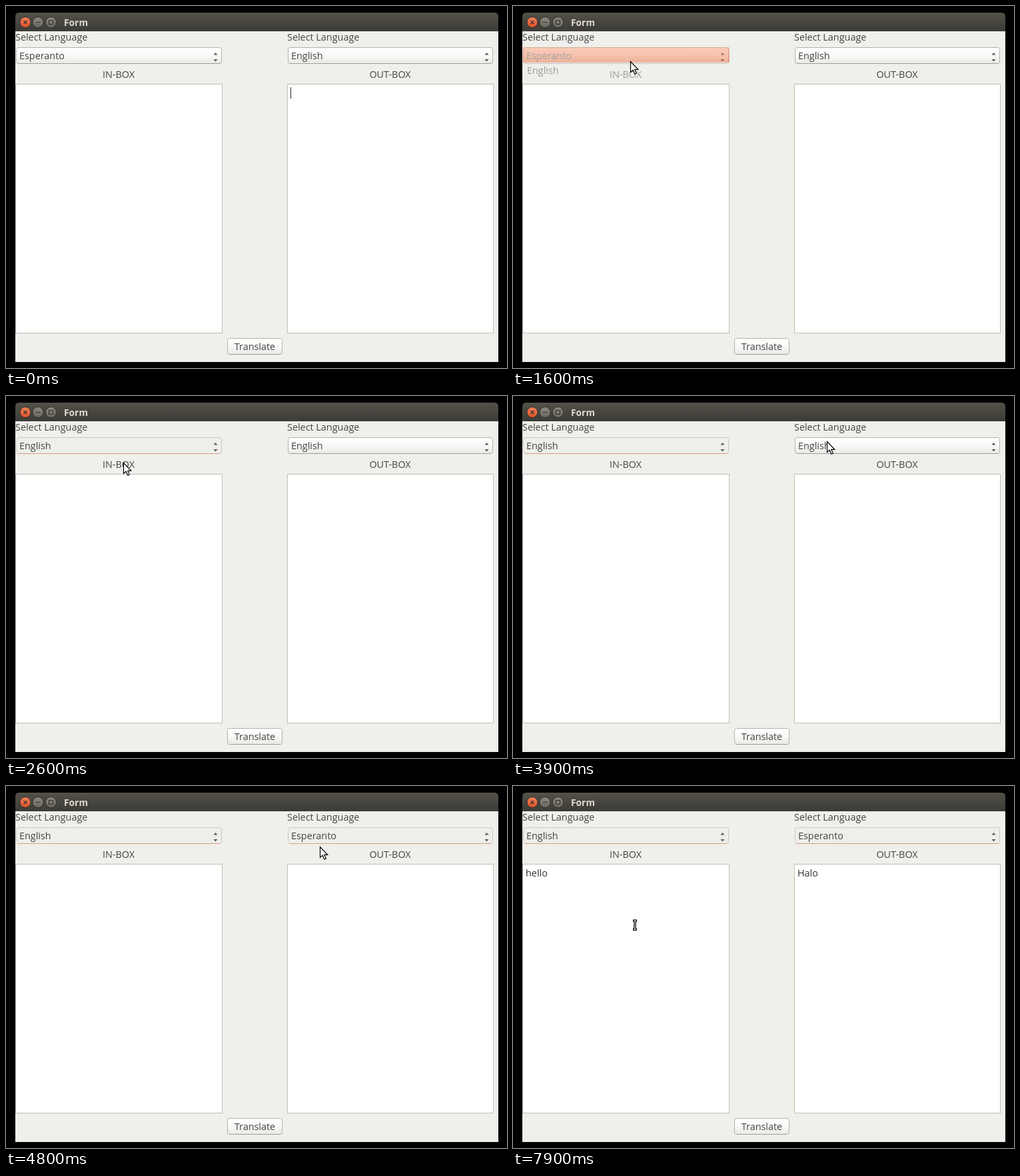
An HTML page for the animation above (8000 ms loop, 752x544 px).

```html
<!DOCTYPE html>
<html lang="en">
<head>
<meta charset="utf-8">
<title>Form</title>
<style>
  html, body { margin: 0; width: 100%; height: 100%; overflow: hidden; background: #000; }
  svg { display: block; width: 752px; height: 544px; }
  text { font: 14.4px "Open Sans", "Noto Sans", sans-serif; fill: #454543; white-space: pre; }
  .title { font-size: 13.8px; font-weight: 700; fill: #dfdbd2; }
  .mid { text-anchor: middle; }
  .area { fill: #fff; stroke: #bfbdb4; }
  .face { fill: url(#face); stroke: #b3b1aa; }
  .base { stroke: #a09e97; }
  .used .face { fill: #eeeeea; stroke: #c9c7c0; }
  .used .base { stroke: #dc9b82; }
  .arrows { fill: #5c5b58; }
  .popup .back { fill: #efefeb; }
  .popup .bar { fill: url(#select); }
  .popup .on { fill: #fff; }
  .typed { fill: #303030; }
</style>
</head>
<body>
<svg viewBox="0 0 752 544">
  <defs>
    <linearGradient id="bar" x2="0" y2="1">
      <stop stop-color="#565349"/><stop offset=".12" stop-color="#504e46"/><stop offset="1" stop-color="#3c3b37"/>
    </linearGradient>
    <linearGradient id="face" x2="0" y2="1">
      <stop stop-color="#fff"/><stop offset=".5" stop-color="#f9f9f8"/><stop offset="1" stop-color="#e8e8e5"/>
    </linearGradient>
    <linearGradient id="select" x2="0" y2="1">
      <stop stop-color="#f69c78"/><stop offset="1" stop-color="#ee7a50"/>
    </linearGradient>
    <linearGradient id="close" x2="0" y2="1">
      <stop stop-color="#f3845c"/><stop offset="1" stop-color="#dd4f24"/>
    </linearGradient>
    <linearGradient id="knob" x2="0" y2="1">
      <stop stop-color="#8d8a80"/><stop offset="1" stop-color="#68665e"/>
    </linearGradient>
  </defs>

  <path d="M14 38V16q0-6 6-6H733q6 0 6 6V38z" fill="url(#bar)"/>
  <path d="M14 38H739V535H14z" fill="#efefeb"/>
  <g stroke="#32312d">
    <circle cx="29" cy="24.5" r="8" fill="url(#close)"/>
    <circle cx="48" cy="24.5" r="8" fill="url(#knob)"/>
    <circle cx="67.500" cy="24.500" r="8" fill="url(#knob)"/>
    <path d="M26.500 22l5 5m0-5l-5 5M44.500 24.500h7M64.500 21.500h6v6h-6z" fill="none" stroke-width="1.2"/>
  </g>
  <text class="title" x="87" y="30">Form</text>

  <g id="panes"></g>

  <rect class="face" x="332.500" y="499.500" width="82" height="24" rx="3"/>
  <path class="base" d="M335 523.500h77"/>
  <text class="mid" x="373.500" y="517">Translate</text>

  <path id="caret" stroke="#222"/>
  <g id="popups"></g>
  <path id="arrow" d="M.5.500V16.500L4.200 13.200 6.800 19.200 9.300 18.100 6.800 12.300H11.800z" fill="#fff" stroke="#000" stroke-width="1.200"/>
  <g id="beam" fill="none">
    <path d="M-3-6.500h6M0-6.500v13M-3 6.500h6" stroke="#000" stroke-width="3.400"/>
    <path d="M-2-6.500h4M0-6.500v13M-2 6.500h4" stroke="#fff"/>
  </g>
</svg>
<script>
const LOOP = 8000, STEP = 100;
const $ = id => document.getElementById(id);

function makePane(x, right, label, items) {
  const w = right - x, tip = right - 10.5;
  $('panes').insertAdjacentHTML('beforeend', `<g>
    <text x="${x}" y="52">Select Language</text>
    <rect class="face" x="${x + 1.5}" y="62.5" width="${w - 3}" height="24" rx="3"/>
    <path class="base" d="M${x + 4} 86.5h${w - 8}"/>
    <path class="arrows" d="M${tip - 3} 73.500l3-3.500 3 3.500zM${tip - 3} 80l3 3.500 3-3.500z"/>
    <text class="value" x="${x + 6}" y="80"></text>
    <text class="mid" x="${x + w / 2 - .5}" y="108">${label}</text>
    <rect class="area" x="${x + .5}" y="117.500" width="${w - 1}" height="374"/>
    <text class="typed" x="${x + 5}" y="136"></text></g>`);
  $('popups').insertAdjacentHTML('beforeend', `<g class="popup">
    <rect class="back" x="${x}" y="61" width="${w}" height="49"/>
    <rect class="bar" x="${x + 1}" width="${w - 1}" height="23"/>
    <text x="${x + 6}" y="80">${items[0]}</text>
    <text x="${x + 7}" y="102">${items[1]}</text></g>`);
  const pane = $('panes').lastElementChild, popup = $('popups').lastElementChild;
  return {
    items, pane, popup,
    value: pane.querySelector('.value'),
    typed: pane.querySelector('.typed'),
    bar: popup.querySelector('.bar'),
    rows: popup.querySelectorAll('text')
  };
}

const inbox = makePane(14, 325, 'IN-BOX', ['Esperanto', 'English']);
const outbox = makePane(422, 732, 'OUT-BOX', ['English', 'Esperanto']);

// Pointer stops: time, x, y
const stops = [
  [300, 650, 546], [1000, 552, 108], [1300, 187, 44], [1400, 176, 83],
  [1900, 176, 83], [2200, 176, 100], [2600, 176, 100], [3300, 471, 68],
  [4000, 471, 68], [4200, 471, 91], [4800, 471, 91], [5300, 183, 209]
];
const input = [[0, ''], [5500, 'h'], [5800, 'he'], [6600, 'hel'], [6900, 'hell'], [7300, 'hello']];
const output = [[0, ''], [5700, 'H'], [6100, 'Li'], [6800, 'Hel'], [7100, 'Infero'], [7500, 'Halo']];

const latest = (list, t) => list.filter(e => e[0] <= t).pop();
const show = (el, on) => el.setAttribute('visibility', on ? 'visible' : 'hidden');

function pointerAt(t) {
  const i = stops.findIndex(s => s[0] > t);
  if (i < 0) return stops[stops.length - 1].slice(1);
  if (!i) return [0, 600];
  const a = stops[i - 1], b = stops[i];
  const u = (t - a[0]) / (b[0] - a[0]), k = u * u * (3 - 2 * u);
  return [1, 2].map(n => a[n] + (b[n] - a[n]) * k);
}

function drawChoice(box, t, open, close, y) {
  const row = y > 86 ? 1 : 0, done = t >= close;
  box.popup.setAttribute('opacity', done ? 0 : Math.max(0, Math.min(1, (t - open) / 200)));
  box.bar.setAttribute('y', row ? 86 : 62);
  box.rows.forEach((el, i) => el.classList.toggle('on', i === row));
  box.value.textContent = box.items[done ? 1 : 0];
  box.pane.classList.toggle('used', done);
}

function drawCaret(t) {
  const [since] = latest(input, t);
  const first = t < 500 || (t >= 1000 && t < 1400);
  const start = since || 5400;
  const typing = t >= start && (t - start) % 1200 < 600;
  show($('caret'), first || typing);
  const x = t < 1500 ? 427 : 20 + Math.round(inbox.typed.getComputedTextLength());
  $('caret').setAttribute('d', `M${x + .5} 122v17`);
}

function draw(t) {
  const [x, y] = pointerAt(t);
  drawChoice(inbox, t, 1500, 2500, y);
  drawChoice(outbox, t, 3900, 4400, y);
  inbox.typed.textContent = latest(input, t)[1];
  outbox.typed.textContent = latest(output, t)[1];
  drawCaret(t);

  const overText = y > 117 && y < 492 && (x < 325 || (x > 422 && x < 732));
  show($('beam'), overText);
  show($('arrow'), !overText);
  $(overText ? 'beam' : 'arrow').setAttribute('transform', `translate(${x} ${y})`);
}

const begin = performance.now();
function tick() {
  const t = (performance.now() - begin) % LOOP;
  draw(Math.floor(t / STEP) * STEP);
  requestAnimationFrame(tick);
}
tick();
</script>
</body>
</html>
```
